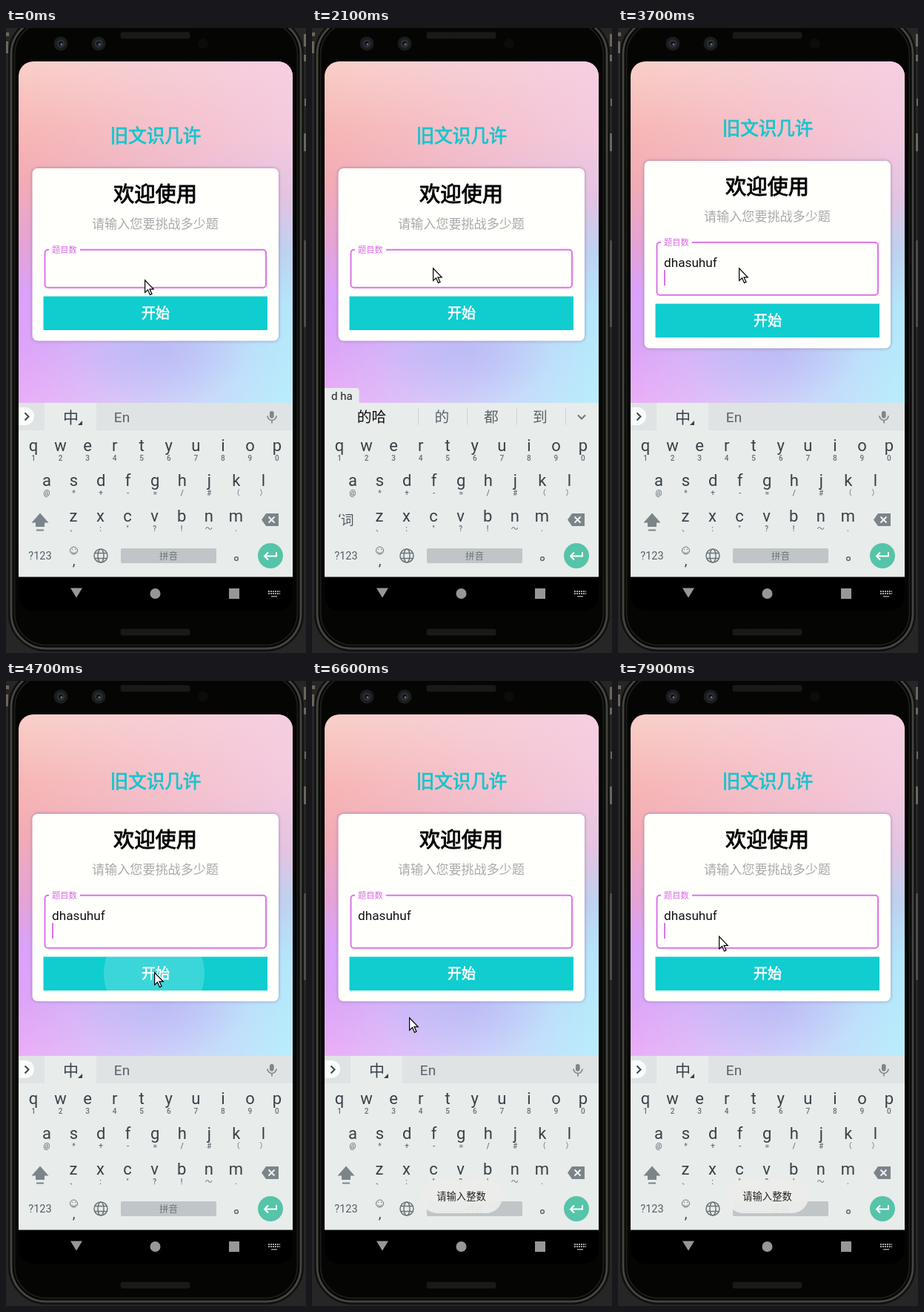
Recreate the animation shown at these times as an HTML page. Size 405 px wide and 842 px high, loop 8000 ms.

```html
<!DOCTYPE html>
<html lang="zh-CN">
<head>
<meta charset="utf-8">
<title>旧文识几许</title>
<style>
html, body { margin: 0; width: 100%; height: 100%; overflow: hidden; background: #262626; }
svg { display: block; width: 405px; height: 842px; }
text { font-family: Roboto, "Noto Sans CJK SC", "Noto Sans CJK", sans-serif; text-anchor: middle; white-space: pre; }
.left { text-anchor: start; }
.mid { font-weight: 500; }
.heavy { fill: currentColor; stroke: currentColor; stroke-width: .032em; }
.line { fill: none; stroke-linecap: butt; }
#card { filter: drop-shadow(0 .5px 2px rgba(70, 30, 90, .4)); }
</style>
</head>
<body>
<svg viewBox="0 0 405 842" xmlns="http://www.w3.org/2000/svg">
  <defs>
    <linearGradient id="warm" x2="0" y2="1">
      <stop offset="0" stop-color="#f9d0c9"/><stop offset=".2" stop-color="#f7b7b5"/>
      <stop offset=".36" stop-color="#f3abb6"/><stop offset=".54" stop-color="#e6a3d6"/>
      <stop offset=".68" stop-color="#dca1fb"/><stop offset=".84" stop-color="#dea4f8"/>
      <stop offset="1" stop-color="#ecaef7"/>
    </linearGradient>
    <linearGradient id="cool" x2="0" y2="1">
      <stop offset="0" stop-color="#f5cee1"/><stop offset=".22" stop-color="#f3c9de"/>
      <stop offset=".4" stop-color="#e2c4e2"/><stop offset=".55" stop-color="#bdd2f0"/>
      <stop offset=".72" stop-color="#b3e7fa"/><stop offset="1" stop-color="#b8eefb"/>
    </linearGradient>
    <linearGradient id="ramp"><stop offset="0" stop-color="#000"/><stop offset="1" stop-color="#fff"/></linearGradient>
    <radialGradient id="blue">
      <stop offset="0" stop-color="#b6b4f3" stop-opacity=".65"/><stop offset="1" stop-color="#b6b4f3" stop-opacity="0"/>
    </radialGradient>
    <mask id="fade"><rect x="17" y="45" width="370" height="460" fill="url(#ramp)"/></mask>
    <clipPath id="screen"><rect x="17" y="45" width="370" height="740" rx="20"/></clipPath>
    <clipPath id="btnClip"><rect x="50.500" y="361.500" width="302.500" height="45.500"/></clipPath>
  </defs>

  <!-- phone body -->
  <rect width="405" height="842" fill="#262626"/>
  <g fill="#6d6659">
    <rect y="6" width="4" height="5"/><rect y="18" width="3" height="16"/>
    <rect x="402" y="8" width="3" height="17"/><rect x="402" y="36" width="3" height="9"/>
    <rect x="403" y="95" width="2" height="10"/><rect x="402" y="142" width="3" height="24"/>
  </g>
  <rect x="402" y="286" width="3" height="117" rx="1" fill="#4c4c4c"/>
  <g class="line">
    <rect x="4" y="-15" width="397" height="854" rx="50" fill="#050603" stroke="#111" stroke-width="2"/>
    <rect x="7" y="-12" width="391" height="848" rx="47" stroke="#444441" stroke-width="3"/>
    <rect x="11.500" y="-7.500" width="382" height="839" rx="43" stroke="#1c1c1a" stroke-width="2"/>
  </g>
  <g id="lenses"></g>
  <circle cx="266" cy="21" r="7" fill="#0c0c0d"/>
  <g fill="#191919" stroke="#222" stroke-dasharray="1 1">
    <rect x="155" y="6" width="93" height="8" rx="2"/><rect x="155" y="810" width="93" height="8" rx="2"/>
  </g>

  <g clip-path="url(#screen)">
    <rect x="17" y="45" width="370" height="740"/>
    <rect x="17" y="45" width="370" height="460" fill="url(#warm)"/>
    <rect x="17" y="45" width="370" height="460" fill="url(#cool)" mask="url(#fade)"/>
    <ellipse cx="207" cy="435" rx="120" ry="75" fill="url(#blue)"/>

    <g id="form">
      <text class="heavy" x="202" y="153.500" font-size="24.5" color="#14c5ce">旧文识几许</text>
      <rect id="card" x="35.500" y="189" width="332.500" height="232.500" rx="7" fill="#fffffc"/>
      <text class="heavy" x="201.500" y="233.800" font-size="28.3" color="#000">欢迎使用</text>
      <text x="201.500" y="270" font-size="17.1" fill="#a9a9a9">请输入您要挑战多少题</text>
      <rect id="field" class="line" x="52.500" y="298.800" width="298.500" height="51" rx="4" stroke="#dc73e9" stroke-width="2"/>
      <rect x="58" y="296" width="42" height="6" fill="#fffffc"/>
      <text class="left" x="62" y="303.300" font-size="11.3" fill="#d968e6">题目数</text>
      <text id="typed" class="left" x="62" y="332" font-size="17.2" fill="#111"></text>
      <rect id="caret" width="2" height="21" fill="#dc73e9"/>
      <g id="button">
        <rect x="50.500" y="361.500" width="302.500" height="45.500" fill="#10cdd0"/>
        <circle id="ripple" cx="200" cy="384" r="0" fill="#fff" clip-path="url(#btnClip)"/>
        <text class="heavy" x="202" y="391" font-size="19" color="#fff">开始</text>
      </g>
    </g>

    <!-- keyboard -->
    <rect x="17" y="505" width="370" height="234.500" fill="#e8eceb"/>
    <g id="idle">
      <rect x="17" y="505" width="370" height="37" fill="#dfe3e4"/>
      <rect x="52" y="505" width="70" height="37" fill="#e8eceb"/>
      <path d="M17 511h9a12 12 0 0 1 0 24h-9z" fill="#fafcfc"/>
      <path class="line" d="M25.500 518.500l5 5-5 5" stroke="#444" stroke-width="2"/>
      <text x="87.500" y="531.500" font-size="21" fill="#374248">中</text>
      <path d="M103 529v6h-6z" fill="#374248"/>
      <text x="156.500" y="530.500" font-size="19" fill="#5a6367">En</text>
      <g class="line" stroke="#7e878b" stroke-width="1.700">
        <rect x="356.800" y="516.800" width="4" height="8" rx="2" fill="#7e878b"/>
        <path d="M353 522.500a6 6 0 0 0 12 0M359 528.500v4"/>
      </g>
      <g fill="#7b8589"><path d="M46 653.500l11.500 13H52v5.500H40v-5.500h-5.500z"/><rect x="41" y="675.500" width="10" height="2"/></g>
    </g>
    <g id="ime">
      <path id="tab" fill="#e8eceb"/>
      <text id="pinyin" class="left" x="26" y="500.500" font-size="15" fill="#222"></text>
      <path class="line" d="M143.500 512v23M209.500 512v23M276.500 512v23M342.500 512v23" stroke="#cdd3d5"/>
      <g id="words" font-size="19.800" fill="#5b6569"></g>
      <path class="line" d="M359 521.500l5 5 5-5" stroke="#6c7579" stroke-width="2"/>
      <text x="46" y="669" font-size="17.500" fill="#4a555a">‘词</text>
    </g>
    <g id="keys"></g>
    <g fill="#7b8589">
      <path d="M345 662.500l6-8.500h17v17h-17z"/>
      <path class="line" d="M354.500 658.500l8 8m0-8l-8 8" stroke="#f4f6f6" stroke-width="1.800"/>
    </g>
    <text x="46" y="716" font-size="14.500" fill="#566065">?123</text>
    <g class="line" stroke="#6b7579">
      <circle cx="91.500" cy="704" r="5"/><path d="M88.500 705.500a3.200 3.200 0 0 0 6 0M89.500 701.500v1.500M93.500 701.500v1.500"/>
      <g stroke-width="1.500"><circle cx="128" cy="711" r="9"/><ellipse cx="128" cy="711" rx="4" ry="9"/><path d="M120 707.500h16M120 714.500h16"/></g>
    </g>
    <text x="91.500" y="724" font-size="19" fill="#374248">,</text>
    <rect x="155" y="701" width="129" height="20" rx="2" fill="#c0c5c7"/>
    <text x="219.500" y="716" font-size="12.500" fill="#6d7579">拼音</text>
    <circle class="line" cx="311" cy="715" r="2.400" stroke="#4a555a" stroke-width="1.200"/>
    <circle cx="357" cy="711" r="17" fill="#55c4a8"/>
    <path class="line" d="M365 706v5.500h-15.500M354 706.500l-5 5 5 5" stroke="#fff" stroke-width="2"/>

    <!-- navigation -->
    <g fill="#979797">
      <path d="M87 754.500h16l-8 13z"/><circle cx="201.500" cy="762" r="7"/><rect x="301" y="755" width="14" height="14"/>
      <path class="line" d="M354 759h16M354 762h16" stroke="#aaa" stroke-width="2" stroke-dasharray="2 1"/>
      <rect x="358" y="765" width="8" height="1.500"/>
    </g>

    <g id="toast">
      <rect x="147" y="672" width="110" height="45" rx="22" fill="#ecedeb" fill-opacity=".94"/>
      <text x="201.500" y="698.800" font-size="13.300" fill="#222">请输入整数</text>
    </g>
  </g>

  <path id="pointer" d="M.6 .8v16.600l3.900-3.700 3 6.700 2.500-1.100-3-6.500h5.200z" fill="#fff" stroke="#000" stroke-width="1.200"/>
</svg>

<script>
const $ = id => document.getElementById(id);
const LOOP = 8000, STEP = 100;

const rows = [
  { x: 37, y: 570, keys: "qwertyuiop", subs: "1234567890" },
  { x: 55, y: 617, keys: "asdfghjkl", subs: "@*+-=/#（）" },
  { x: 91, y: 665, keys: "zxcvbnm", subs: "、:\"?!～." }
];
$("keys").innerHTML = rows.map(r => [...r.keys].map((k, i) => {
  const x = r.x + 36.55 * i;
  return `<text x="${x}" y="${r.y}" font-size="22" fill="#374248">${k}</text>` +
    `<text class="mid" x="${x}" y="${r.y + 12.5}" font-size="10" fill="#667175">${r.subs[i]}</text>`;
}).join("")).join("");

$("lenses").innerHTML = [74, 125].map(x =>
  `<circle cx="${x}" cy="21" r="9.5" fill="#1b1c1e"/><circle cx="${x}" cy="21" r="5.500" fill="#2c3034"/>` +
  `<circle cx="${x}" cy="21" r="3" fill="#101418"/><circle cx="${x + 1}" cy="22" r="1.500" fill="#66717a"/>`).join("");

// time, x, y
const path = [
  [0, 187, 339], [300, 187, 339], [400, 337, 330], [500, 230, 326], [600, 163, 323],
  [4100, 163, 323], [4600, 200, 392], [5600, 200, 392], [5700, 308, 486], [5800, 308, 486],
  [6000, 195, 454], [6300, 195, 454], [6600, 131, 453], [6900, 308, 430], [7000, 308, 430],
  [7200, 170, 589], [7300, 170, 589], [7700, 320, 440], [7900, 136, 343.5]
];
// time, pinyin, candidates
const typing = [
  [2000, "d", "的 大 都 到"],
  [2100, "d ha", "的哈 的 都 到"],
  [2200, "d ha su", "的哈苏 的 都 到"],
  [2300, "d ha su hu f", "的哈苏护肤 大 得 地"],
  [2500, "d ha su hu f", "的哈苏护肤 的 都 到"]
];
// caret toggles, starting hidden
const blinks = [100, 600, 1200, 1700, 2200, 2700, 3100, 4200, 4700, 5200, 5700, 6200, 6700, 7200, 7700];

const clamp = v => Math.max(0, Math.min(1, v));
const last = (list, t) => list.filter(s => s[0] <= t).pop();
const show = (id, on) => $(id).setAttribute("visibility", on ? "visible" : "hidden");
const move = (id, x, y) => $(id).setAttribute("transform", `translate(${x} ${y})`);

function pointerAt(t) {
  const i = path.findIndex(p => p[0] > t);
  if (i < 0) return path[path.length - 1].slice(1);
  const [a, b] = [path[i - 1], path[i]], k = (t - a[0]) / (b[0] - a[0]);
  return [a[1] + (b[1] - a[1]) * k, a[2] + (b[2] - a[2]) * k];
}

function drawIme(t) {
  const on = t >= 2000 && t < 3100;
  show("idle", !on);
  show("ime", on);
  if (!on) return;
  const [, pinyin, words] = last(typing, t);
  $("pinyin").textContent = pinyin;
  const w = $("pinyin").getComputedTextLength() + 18;
  $("tab").setAttribute("d", `M17 485h${w - 4}q4 0 4 4v16H17z`);
  $("words").innerHTML = words.split(" ").map((word, i) =>
    `<text x="${[80.5, 175.5, 242, 308][i]}" y="531"${i ? "" : ' fill="#111"'}>${word}</text>`).join("");
}

function draw(t) {
  const tall = t >= 3600, entered = t >= 3100;
  move("form", 0, tall ? -10 : 0);
  move("button", 0, tall ? 20 : 0);
  $("card").setAttribute("height", tall ? 252.5 : 232.5);
  $("field").setAttribute("height", tall ? 71 : 51);
  $("typed").textContent = entered ? "dhasuhuf" : "";

  show("caret", blinks.filter(b => b <= t).length % 2);
  move("caret", entered && !tall ? 135 : 62, tall ? 336 : 316);

  const press = clamp((t - 4500) / 500);
  $("ripple").setAttribute("r", 170 * press);
  $("ripple").setAttribute("opacity", press ? .3 * (1 - press) : 0);
  $("toast").setAttribute("opacity", clamp((t - 4700) / 500));

  drawIme(t);
  move("pointer", ...pointerAt(t));
}

const start = performance.now();
let shown = -1;
function tick() {
  const t = Math.floor((performance.now() - start) % LOOP / STEP) * STEP;
  if (t !== shown) draw(shown = t);
  requestAnimationFrame(tick);
}
tick();
</script>
</body>
</html>
```
